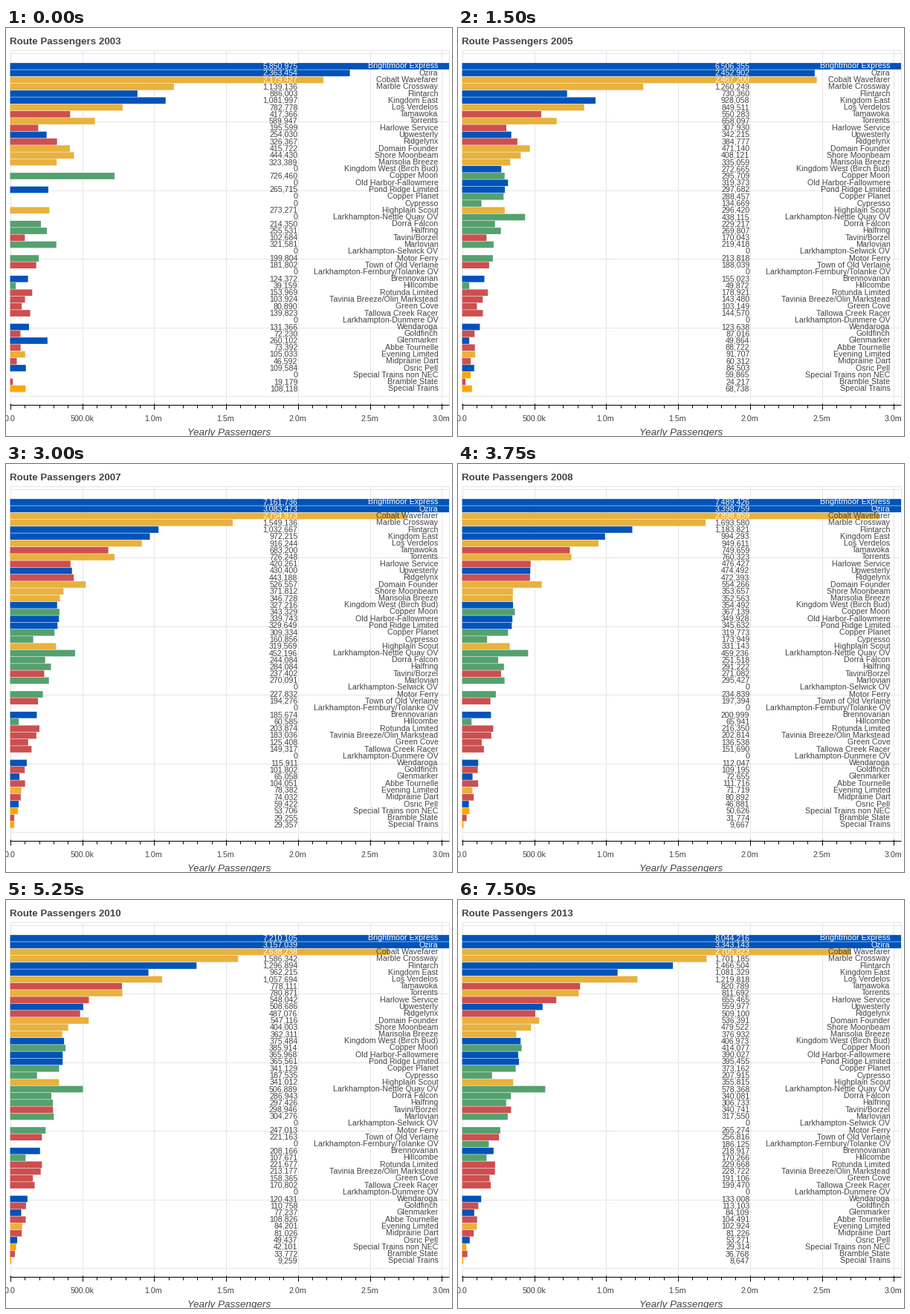
These frames come from a looping animation (600x550 px, 8 s). A matplotlib script:

```python
import numpy as np
import matplotlib.pyplot as plt
from matplotlib.animation import FuncAnimation
from matplotlib.patches import Rectangle

W, H, DPI = 600, 550, 100
PX = 72 / DPI                      # points per pixel
LEFT, RIGHT, TOP, BOTTOM = 5.5, 595.5, 29.5, 507.5
PER_M = 193.4                      # pixels per million passengers
ROW = 9.25
ZERO_Y = 495.5
GREY, DARK = "#e5e5e5", "#444444"
COLORS = {"B": "#0053ba", "Y": "#e9b13d", "R": "#cd4f50",
          "G": "#54a16e", "O": "#ffa500"}

# Key years, chosen by how many values a route lists
KEY_YEARS = {2: (2011, 2013), 3: (2003, 2008, 2013),
             4: (2003, 2005, 2008, 2013)}
SLUMP = {2009: 0.92, 2010: 0.935}  # dip of the largest routes

ROUTES = [
    ("Brightmoor Express", "B", 5850975, 7489426, 8044216),
    ("Ozira", "B", 2363454, 2452902, 3398759, 3343143),
    ("Cobalt Wavefarer", "Y", 2179427, 2898859, 2705823),
    ("Marble Crossway", "Y", 1139136, 1260249, 1693580, 1701185),
    ("Flintarch", "B", 886003, 730360, 1183821, 1466504),
    ("Kingdom East", "B", 1081997, 928058, 994293, 1081329),
    ("Los Verdelos", "Y", 782778, 949611, 1219818),
    ("Tamawoka", "R", 417366, 749659, 820789),
    ("Torrents", "Y", 589947, 760323, 811692),
    ("Harlowe Service", "R", 195599, 476427, 655465),
    ("Upwesterly", "B", 254030, 474492, 559977),
    ("Ridgelynx", "R", 326367, 472393, 509100),
    ("Domain Founder", "Y", 415722, 554266, 536391),
    ("Shore Moonbeam", "Y", 444430, 353657, 479522),
    ("Marisolia Breeze", "Y", 323389, 352563, 376932),
    ("Kingdom West (Birch Bud)", "B", 0, 272665, 354492, 406973),
    ("Copper Moon", "G", 726460, 295709, 367139, 414077),
    ("Old Harbor-Fallowmere", "B", 0, 319373, 349928, 390027),
    ("Pond Ridge Limited", "B", 265715, 345632, 395455),
    ("Copper Planet", "G", 0, 288457, 319773, 373162),
    ("Cypresso", "G", 0, 134669, 173949, 207915),
    ("Highplain Scout", "Y", 273271, 331143, 355815),
    ("Larkhampton-Nettle Quay OV", "G", 0, 438115, 459236, 578368),
    ("Dorra Falcon", "G", 214350, 251518, 340081),
    ("Halfring", "G", 255531, 291222, 306733),
    ("Tavini/Borzel", "R", 102684, 271082, 340741),
    ("Marlovian", "G", 321581, 219418, 295427, 317550),
    ("Larkhampton-Selwick OV", "G"),
    ("Motor Ferry", "G", 199804, 234839, 265274),
    ("Town of Old Verlaine", "R", 181802, 197394, 256816),
    ("Larkhampton-Fernbury/Tolanke OV", "G", 162051, 186125),
    ("Brennovarian", "B", 124372, 200999, 218917),
    ("Hillcombe", "G", 39159, 65941, 170266),
    ("Rotunda Limited", "R", 153969, 216350, 229668),
    ("Tavinia Breeze/Olin Markstead", "R", 103924, 202814, 228722),
    ("Green Cove", "R", 80890, 136538, 191106),
    ("Tallowa Creek Racer", "R", 139823, 151690, 199470),
    ("Larkhampton-Dunmere OV", "G"),
    ("Wendaroga", "B", 131366, 112047, 133008),
    ("Goldfinch", "R", 72230, 109195, 113103),
    ("Glenmarker", "B", 260102, 49864, 72655, 84109),
    ("Abbe Tournelle", "R", 73392, 111716, 104491),
    ("Evening Limited", "Y", 105033, 71719, 102924),
    ("Midprairie Dart", "R", 46592, 80892, 81226),
    ("Osric Pell", "B", 109584, 46881, 53271),
    ("Special Trains non NEC", "O", 0, 59865, 50626, 29314),
    ("Bramble State", "R", 19179, 31774, 36768),
    ("Special Trains", "O", 108118, 9667, 8647),
]


def riders(values, year):
    if not values:
        return 0
    count = np.interp(year, KEY_YEARS[len(values)], values, left=0)
    if values[0] > 1e6:
        count *= SLUMP.get(year, 1)
    return round(float(count))


plt.rcParams["font.family"] = "Liberation Sans"
fig = plt.figure(figsize=(W / DPI, H / DPI), dpi=DPI, facecolor="white")
ax = fig.add_axes([0, 0, 1, 1])
ax.set_xlim(0, W)
ax.set_ylim(H, 0)
ax.axis("off")


def line(x0, y0, x1, y1, color, z):
    ax.plot([x0, x1], [y0, y1], color=color, lw=PX, zorder=z,
            solid_capstyle="butt")


def label(x, y, text, size=10.67, color=DARK, **style):
    return ax.text(x, y, text, fontsize=size * PX, color=color,
                   va="baseline", zorder=5, **style)


def snap(v):
    return np.floor(v) + 0.5


# Grid and frame
for k in range(0, 51, 10):
    y = snap(ZERO_Y - k * ROW)
    line(LEFT, y, RIGHT, y, GREY, 1)
for k in range(7):
    x = snap(LEFT + k * PER_M / 2)
    line(x, TOP, x, BOTTOM, GREY, 1)
line(LEFT, TOP, RIGHT, TOP, GREY, 1)
line(RIGHT, TOP, RIGHT, BOTTOM, GREY, 1)

# Horizontal axis
line(LEFT - 0.5, BOTTOM, RIGHT + 0.5, BOTTOM, "black", 4)
for k in range(31):
    x = snap(LEFT + k * PER_M / 10)
    major = k % 5 == 0
    line(x, BOTTOM - (2 if major else 0), x, BOTTOM + (6 if major else 4),
         "black", 4)
    if major:
        text = "500.0k" if k == 5 else f"{k / 10:.1f}" + ("m" if k else "")
        label(x, 530, text, ha="center")
label(300.5, 549, "Yearly Passengers", 13.33, ha="center", style="italic")
title = label(5, 22, "", 13.33, weight="bold")

# One bar, count and name per route
rows = []
for i, (name, color, *values) in enumerate(ROUTES):
    y = ZERO_Y - (len(ROUTES) - i) * ROW
    bar = Rectangle((LEFT, y - 4.35), 0, 8.7, fc=COLORS[color], lw=0,
                    zorder=3, snap=False)
    ax.add_patch(bar)
    count = label(392.5, y + 3, "", ha="right")
    tag = label(581.5, y + 3, name, ha="right")
    rows.append((values, bar, count, tag))


def update(frame):
    year = 2003 + frame // 3
    title.set_text(f"Route Passengers {year}")
    for values, bar, count, tag in rows:
        n = riders(values, year)
        bar.set_width(min(n / 1e6 * PER_M, RIGHT + 0.5 - LEFT))
        count.set_text(f"{n:,}")
        count.set_color("white" if n > 2e6 else DARK)
        tag.set_color("white" if n > 3e6 else DARK)
    return []


anim = FuncAnimation(fig, update, frames=32, interval=250, repeat=True,
                     repeat_delay=0, init_func=lambda: update(0))
plt.show()
```
